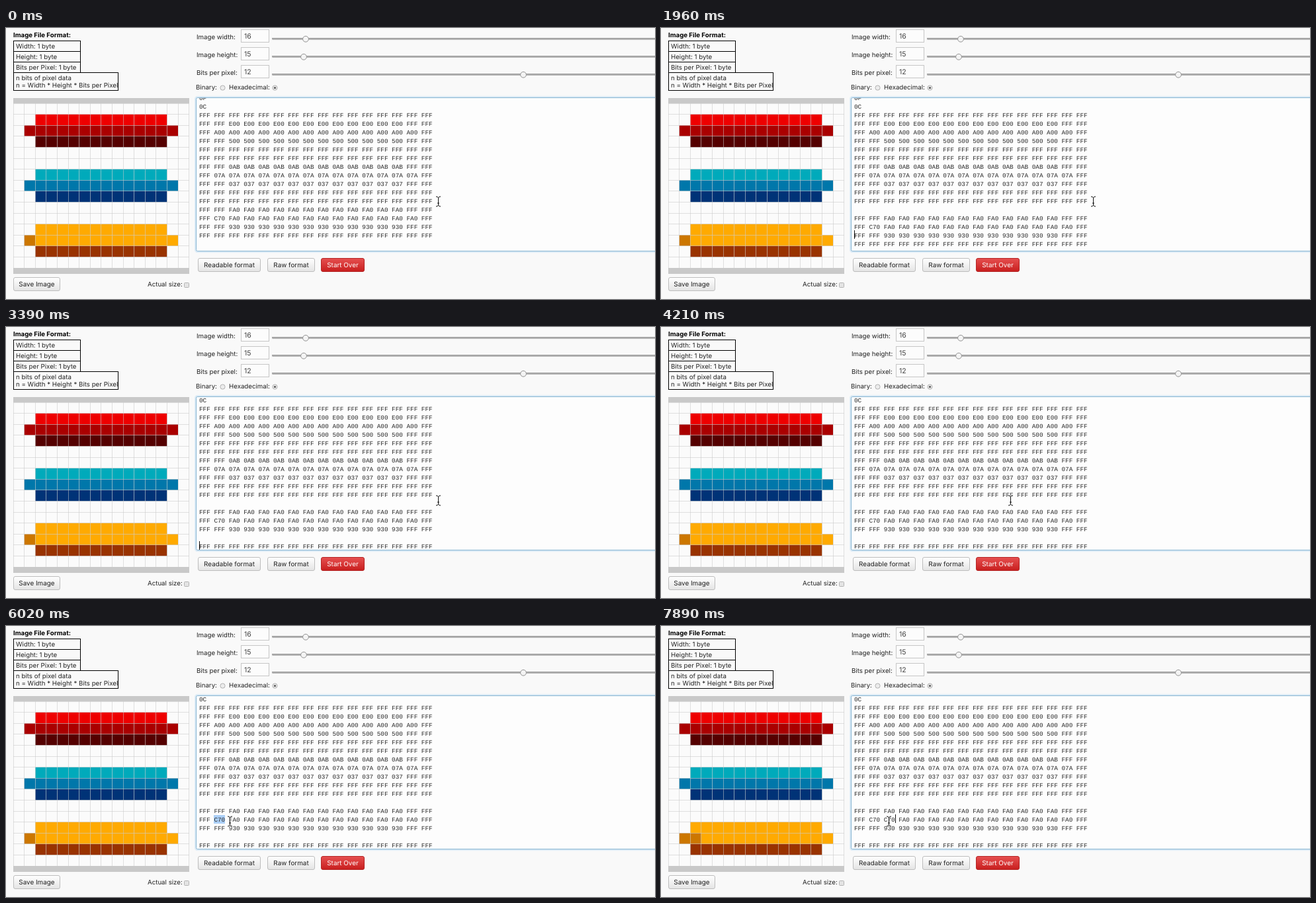
Recreate the animation shown at these times as an HTML page. Size 981 px wide and 410 px high, loop 8000 ms.

```html
<!DOCTYPE html>
<html lang="en">
<head>
<meta charset="utf-8">
<title>Pixel editor</title>
<style>
  html, body { margin: 0; width: 100%; height: 100%; overflow: hidden; background: #f9f9f9; }
  svg { display: block; }
  text { font: 9.7px Inter, Roboto, sans-serif; fill: #222; white-space: pre; text-rendering: geometricPrecision; }
  .bold { font-weight: 700; fill: #000; }
  .value { font-size: 10.5px; fill: #444; }
  .button { font-size: 9.9px; text-anchor: middle; }
  .code { font: 9.333px "Courier New", "Liberation Mono", monospace; fill: #2a2a2a; }
  #mouse path { fill: none; stroke: #111; }
  #mouse .halo { stroke: #fff; stroke-width: 2.4; stroke-opacity: .8; }
</style>
</head>
<body>
<svg width="981" height="410" viewBox="0 0 981 410">
  <defs>
    <linearGradient id="plain" x2="0" y2="1"><stop stop-color="#fff"/><stop offset="1" stop-color="#e4e4e4"/></linearGradient>
    <linearGradient id="red" x2="0" y2="1"><stop stop-color="#e65050"/><stop offset="1" stop-color="#c81e1e"/></linearGradient>
    <clipPath id="area"><path d="M289 106H981V337H289Z"/></clipPath>
  </defs>
  <g id="ui"></g>
  <g id="picture"></g>
  <rect x="287.5" y="105.5" width="720" height="232" rx="2" fill="none" stroke="#dcebf6" stroke-width="5"/>
  <rect x="287.5" y="105.5" width="720" height="232" rx="2" fill="#fdfdfd" stroke="#86b4d2"/>
  <g clip-path="url(#area)">
    <rect id="selection" y="286" width="17" height="13" fill="#acd0f8"/>
    <g id="code"></g>
    <rect id="caret" width="1" height="13" fill="#111"/>
  </g>
  <g id="mouse"></g>
</svg>
<script>
const LOOP = 8000, CELL = 16.6, CHAR = 5.6, LEFT = 292, LINE = 13, BLINK = 480;
const $ = id => document.getElementById(id);

function set(node, attrs) {
  for (const key in attrs) node.setAttribute(key, attrs[key]);
}
function add(parent, tag, attrs, content = '') {
  const node = document.createElementNS('http://www.w3.org/2000/svg', tag);
  set(node, attrs);
  node.textContent = content;
  parent.append(node);
  return node;
}
const ui = $('ui');
const label = (x, y, words, cls = '') => add(ui, 'text', { x, y, class: cls }, words);
const box = (x, y, width, height, fill, stroke, rx = 0) =>
  add(ui, 'rect', { x: x + .5, y: y + .5, width, height, fill, stroke, rx });
const circle = (cx, cy, r, fill, stroke = 'none') => add(ui, 'circle', { cx, cy, r, fill, stroke });

function button(x, y, width, words, red) {
  box(x, y, width, 20, red ? 'url(#red)' : 'url(#plain)', red ? '#b42424' : '#bdbdbd', 2.5);
  label(x + width / 2 + .5, y + 14, words, 'button').style.fill = red ? '#fff' : '#222';
}
function radio(x, words, textX, on) {
  label(textX, 93, words);
  circle(x, 90.5, 3.6, '#ececec', '#b0b0b0');
  if (on) circle(x, 90.5, 1.6, '#555');
}

// Format table
label(11, 14, 'Image File Format:', 'bold');
['Width: 1 byte', 'Height: 1 byte', 'Bits per Pixel: 1 byte'].forEach((words, i) => {
  box(11, 19 + i * 16, 101, 16, 'none', '#000');
  label(15, 31 + i * 16, words);
});
box(11, 67, 158, 27, 'none', '#000');
label(15, 79, 'n bits of pixel data');
label(15, 90, 'n = Width * Height * Bits per Pixel');

// Sliders
[['Image width:', 16, 453], ['Image height:', 15, 450], ['Bits per pixel:', 12, 782]].forEach(([words, value, x], i) => {
  const y = i * 27;
  label(288, y + 17, words);
  box(355, y + 2, 42, 19, '#fcfcfc', '#c6c6c6');
  label(360, y + 16, value, 'value');
  add(ui, 'rect', { x: 402, y: y + 15, width: 590, height: 3, rx: 1.5, fill: '#b3b3b3' });
  add(ui, 'rect', { x: 402, y: y + 15, width: 590, height: 1, fill: '#969696' });
  circle(x, y + 16.7, 4.4, '#f4f4f4', '#929292');
});

// Options and buttons
radio(327.5, 'Binary:', 287);
radio(406.5, 'Hexadecimal:', 337, true);
label(214, 391, 'Actual size:');
box(269, 385, 7, 7, '#e4e4e4', '#b4b4b4', 1);
button(11, 377, 70, 'Save Image');
button(290, 348, 94, 'Readable format');
button(395, 348, 71, 'Raw format');
button(476, 348, 65, 'Start Over', true);

// Three bars, each three rows tall with a wider middle row
const hues = ['E00', 'A00', '500', '0AB', '07A', '037', 'FA0', 'FA0', '930'];
const pixels = Array.from({ length: 15 }, (_, row) => Array.from({ length: 16 }, (_, col) => {
  const part = row % 5, inset = part === 2 ? 1 : 2;
  const filled = part > 0 && part < 4 && col >= inset && col < 16 - inset;
  return filled ? hues[Math.floor(row / 5) * 3 + part - 1] : 'FFF';
}));
pixels[12][1] = 'C70';

const picture = $('picture');
add(picture, 'rect', { x: 11, y: 106, width: 266, height: 266, fill: '#c9c9c9' });
add(picture, 'rect', { x: 11, y: 114, width: 266, height: 249, fill: '#fbfbfb' });
const cells = pixels.map((line, row) => line.map((hue, col) => add(picture, 'rect', {
  x: 11 + col * CELL, y: 114 + row * CELL, width: CELL, height: CELL,
  fill: hue === 'FFF' ? 'none' : '#' + hue
})));
const edge = (from, i) => Math.floor(from + i * CELL) + .5;
let grid = '';
for (let i = 0; i <= 16; i++) {
  grid += `M${edge(11, i)} 114V363`;
  if (i < 16) grid += `M11 ${edge(114, i)}H277`;
}
add(picture, 'path', { d: grid, stroke: '#c8c8c8', 'stroke-opacity': .55 });

const lines = ['0F', '0C', ...pixels.map(line => line.join(' '))]
  .map(words => add($('code'), 'text', { x: LEFT, class: 'code' }, words));

// I-beam pointer, outlined in white
const beam = 'M-3.5-7.5Q-.5-7.5 0-5.5Q.5-7.5 3.5-7.5M0-5.5V5.5M-3.5 7.5Q-.5 7.5 0 5.5Q.5 7.5 3.5 7.5M-1.5 2.5H1.5';
for (const cls of ['halo', 'ink']) add($('mouse'), 'path', { d: beam, class: cls });

// Each key moves the caret one line down; the first and last are Enter
const keys = [830, 1660, 1780, 1960, 2790, 3390];
const [ENTER, SCROLL] = [keys[0], keys[5]];
// Mouse clicks and the paste: time, caret column, or word to select
const edits = [
  { at: 5720, col: 6 }, { at: 5900, word: 1 }, { at: 7170, col: 10 }, { at: 7290, word: 2 }, { at: 7890, col: 11 }
];
const PASTE = edits[4].at;
// Pointer moves: start, end, x, y
const moves = [
  [3770, 4030, 539, 260], [4180, 4730, 337, 291], [5180, 5490, 324, 294],
  [5970, 6160, 378, 299], [6490, 6630, 359, 297], [6840, 7100, 344, 295]
];

function pointer(t) {
  let x = 653, y = 262;
  for (const [start, end, toX, toY] of moves) {
    const k = Math.min(1, Math.max(0, (t - start) / (end - start)));
    x += (toX - x) * k;
    y += (toY - y) * k;
  }
  return [x, y].map(v => Math.round(v) + .5);
}

function caret(t) {
  const edit = edits.filter(e => e.at <= t).pop();
  if (edit) return { since: edit.at, y: 285, ...edit };
  const pressed = keys.filter(at => at <= t);
  return {
    since: pressed.length ? pressed.pop() : 180 - 2 * BLINK,
    col: t < ENTER ? 64 : 0,
    y: 254 + LINE * keys.filter(at => at <= t).length - (t >= SCROLL ? 8 : 0)
  };
}
const column = col => Math.round(LEFT + col * CHAR);
const show = (node, on) => set(node, { visibility: on ? 'visible' : 'hidden' });

function draw(t) {
  lines.forEach((node, i) => {
    const breaks = (t >= ENTER && i >= 13) + (t >= SCROLL && i >= 16);
    set(node, { y: 109 + LINE * (i + breaks) - (t >= SCROLL ? 8 : 0) });
  });
  pixels[12][2] = t >= PASTE ? 'C70' : 'FA0';
  lines[14].textContent = pixels[12].join(' ');
  set(cells[12][2], { fill: '#' + pixels[12][2] });

  const { since, col, word, y } = caret(t);
  show($('caret'), !word && (t - since) % (2 * BLINK) < BLINK);
  show($('selection'), word);
  if (word) set($('selection'), { x: column(word * 4) });
  else set($('caret'), { x: column(col), y });

  set($('mouse'), { transform: `translate(${pointer(t)})` });
}

const start = performance.now();
function tick() {
  draw((performance.now() - start) % LOOP);
  requestAnimationFrame(tick);
}
tick();
</script>
</body>
</html>
```
